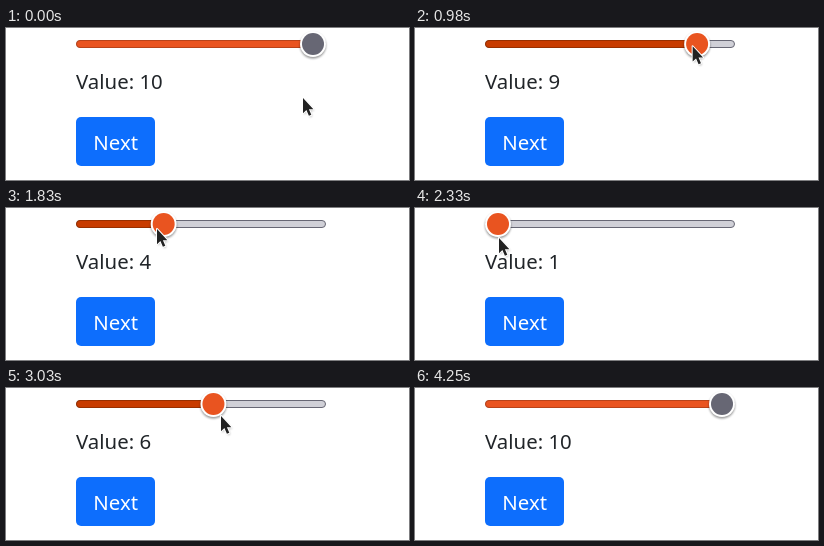
Write an HTML page that moves like this. It is 403 px wide and 152 px high and loops after 4610 ms.

```html
<!DOCTYPE html>
<html lang="en">
<head>
<meta charset="utf-8">
<title>Range slider</title>
<style>
  html, body { margin: 0; width: 100%; height: 100%; overflow: hidden; background: #fff; }
  svg { display: block; width: 403px; height: 152px; }
  text { font: 20.4px "Noto Sans", "Open Sans", sans-serif; fill: #212529; }
  #next { fill: #fff; text-anchor: middle; }
</style>
</head>
<body>
<svg viewBox="0 0 403 152">
  <defs>
    <filter id="soft" x="-40%" y="-40%" width="180%" height="180%">
      <feGaussianBlur stdDeviation="1.2"/>
    </filter>
    <path id="arrow" d="M1 1V16.2L4.4 13.1L6.9 18.8L9.3 17.8L6.9 12.2H11.4Z"/>
  </defs>
  <rect id="track" x="70.5" y="12.5" width="249" height="7" rx="3.5"/>
  <rect id="fill" x="70.5" y="12.5" height="7" rx="3.5"/>
  <g id="thumb">
    <circle cy="1.6" r="13" fill="#000" opacity=".42" filter="url(#soft)"/>
    <circle r="13" fill="#fff"/>
    <circle id="knob" r="11"/>
  </g>
  <text id="value" x="70" y="61"></text>
  <rect x="70" y="89" width="79" height="49" rx="5" fill="#0d6efd"/>
  <text id="next" x="109.7" y="122">Next</text>
  <g id="cursor">
    <use href="#arrow" x="1" y="1.5" opacity=".3" filter="url(#soft)"/>
    <use href="#arrow" fill="#222" stroke="#fff" stroke-width="2" stroke-linejoin="round" paint-order="stroke"/>
  </g>
</svg>
<script>
  const LOOP = 4610, GRAB = 830, RELEASE = 4050, HIDE = 4250;
  const MIN_X = 83, STEP_X = 224 / 9;
  const START = [296, 69];

  // Pointer moves: start ms, end ms, steps, x, y
  const MOVES = [
    [100, 450, 4, 304, 18],
    [830, 1330, 9, 222, 16],
    [1400, 1830, 8, 150, 20],
    [1930, 2330, 7, 83, 29],
    [2630, 3030, 8, 214, 27],
    [3130, 3150, 2, 228, 27],
    [3230, 3630, 7, 323, 31],
    [4050, 4250, 6, 321, 33]
  ];

  const LOOKS = {
    idle:  { knob: '#676774', fill: '#e95420', edge: '#b8431a', track: '#e9e9ed', line: '#8f8f9d' },
    hover: { knob: '#484851', fill: '#c83c00', edge: '#983000', track: '#d0d0d7', line: '#676774' },
    drag:  { knob: '#e95420', fill: '#c83c00', edge: '#983000', track: '#d0d0d7', line: '#676774' }
  };

  const $ = id => document.getElementById(id);
  const set = (id, attrs) => {
    for (const key in attrs) $(id).setAttribute(key, attrs[key]);
  };

  // The slider answers one pointer step late.
  function pointer(t) {
    let [x, y] = START, lagX = x;
    for (const [from, to, steps, endX, endY] of MOVES) {
      if (t < from) break;
      const p = Math.min(1, (t - from) / (to - from));
      const k = Math.floor(p * (steps - 1) + 1e-6) + 1;
      lagX = x + (endX - x) * (k - 1) / steps;
      x += (endX - x) * k / steps;
      y += (endY - y) * k / steps;
    }
    return { x, y, lagX };
  }

  function draw(t) {
    const { x, y, lagX } = pointer(t);
    const dragging = t >= GRAB && t < RELEASE;
    const hovering = y < 27;
    const look = LOOKS[dragging ? 'drag' : hovering ? 'hover' : 'idle'];
    const raw = Math.round(1 + (lagX - MIN_X) / STEP_X);
    const value = dragging ? Math.max(1, Math.min(10, raw)) : 10;
    const thumbX = MIN_X + (value - 1) * STEP_X;

    set('track', { fill: look.track, stroke: look.line });
    set('fill', {
      width: thumbX - 70.5, fill: look.fill, stroke: look.edge,
      visibility: value > 1 ? 'visible' : 'hidden'
    });
    set('thumb', { transform: `translate(${thumbX} 16)` });
    set('knob', { fill: look.knob });
    set('cursor', {
      transform: `translate(${x} ${y})`,
      visibility: t < HIDE ? 'visible' : 'hidden'
    });
    $('value').textContent = `Value: ${value}`;
  }

  const origin = performance.now();
  function tick() {
    draw((performance.now() - origin) % LOOP);
    requestAnimationFrame(tick);
  }
  tick();
</script>
</body>
</html>
```
